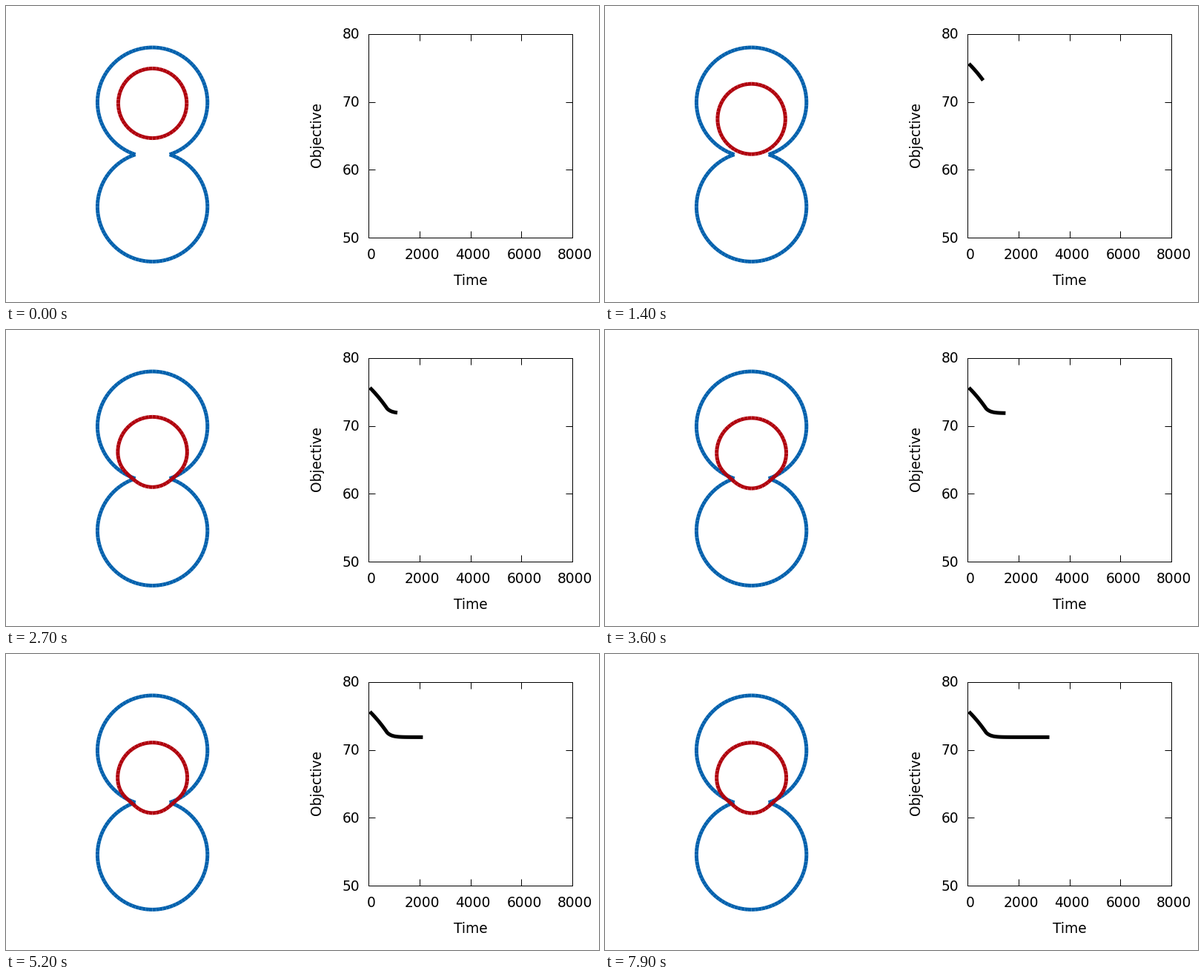
Recreate the animation shown at these times as a matplotlib script. Size 800 by 400 pixels, loop 8 s.

```python
import numpy as np
import matplotlib.pyplot as plt
from matplotlib.animation import FuncAnimation
from matplotlib.collections import LineCollection

W, H, DPI = 800, 400, 100
FRAMES, STEP = 80, 100
PX = 72 / DPI
BLUE, RED = "#0060ad", "#b0000c"
LEFT, TOP, SIDE = 489, 38, 275
RIGHT, BOTTOM = LEFT + SIDE, TOP + SIDE
CX = 197.6
R, UPPER, LOWER = 74.2, 130.2, 271.2
HIT = 19  # step at which the drop reaches the neck

plt.rcParams["font.family"] = "DejaVu Sans"
fig = plt.figure(figsize=(W / DPI, H / DPI), dpi=DPI, facecolor="white")
ax = fig.add_axes([0, 0, 1, 1])
ax.set_xlim(0, W)
ax.set_ylim(H, 0)
ax.axis("off")


def sink(n, start, speed, accel, hit, rest, tau):
    """Accelerate until hit, then settle exponentially at rest."""
    m = np.minimum(n, hit)
    y = start + speed * m + accel * m * m
    return rest - (rest - y) * np.exp(-np.maximum(n - hit, 0) / tau)


def pieces(x, y):
    pts = np.column_stack([x, y])
    return np.stack([pts[:-1], pts[1:]], axis=1)


def stroke(color, z):
    lines = LineCollection([], colors=color, linewidths=5 * PX,
                           capstyle="butt", zorder=z)
    ax.add_collection(lines, autolim=False)
    return lines


def rule(x, y):
    ax.plot(x, y, color="black", lw=PX, solid_capstyle="butt",
            solid_joinstyle="miter")


def label(x, y, s, **kw):
    kw = {"ha": "center", "va": "baseline", "fontsize": 18.67 * PX, **kw}
    ax.text(x, y, s, **kw)


def vessel():
    """Two overlapping circles, open at the neck."""
    neck = np.arccos((LOWER - UPPER) / 2 / R)
    a = np.linspace(neck, 2 * np.pi - neck, 91)
    x = CX + R * np.sin(a)
    dy = R * np.cos(a)
    return np.concatenate([pieces(x, UPPER + dy), pieces(x, LOWER - dy)])


def drop(n):
    """Ring that stretches while sinking and is pinched by the neck."""
    cy = sink(n, 131.5, 1.38, 0.0096, HIT, 167.5, 9)
    squeeze = np.clip((cy - 159) / 8, 0, 1)
    stretch = 0.6 * np.sin(np.pi * min(n / HIT, 1))
    rx = 46.2 + 0.8 * squeeze - stretch
    ry = 47.1 + 0.6 * squeeze + stretch
    a = np.linspace(0, 2 * np.pi, 61)
    tilt = np.arctan2(np.abs(np.cos(a)), np.sin(a))
    k = 1 - 0.07 * squeeze * np.exp(-((tilt - 0.72) / 0.38) ** 2)
    return pieces(CX + rx * k * np.cos(a), cy + ry * k * np.sin(a))


# Chart frame, ticks and labels
rule([LEFT, RIGHT, RIGHT, LEFT, LEFT], [TOP, TOP, BOTTOM, BOTTOM, TOP])
for v in range(0, 8001, 2000):
    x = LEFT + SIDE * v / 8000
    rule([x, x], [TOP, TOP + 9])
    rule([x, x], [BOTTOM, BOTTOM - 9])
    label(x + 3.7, 342, str(v))
for v in range(50, 81, 10):
    y = BOTTOM - SIDE * (v - 50) / 30
    rule([LEFT, LEFT + 9], [y, y])
    rule([RIGHT, RIGHT - 9], [y, y])
    label(477.5, y + 6.5, str(v), ha="right")
label(627, 377, "Time")
label(425, 174.5, "Objective", rotation=90, rotation_mode="anchor")

stroke(BLUE, 3).set_segments(vessel())
ring = stroke(RED, 4)
curve, = ax.plot([], [], color="black", lw=5 * PX, zorder=5,
                 solid_capstyle="butt", solid_joinstyle="round")

steps = np.arange(FRAMES)
curve_x = LEFT + 0.5 + SIDE * 40 * (steps + 1) / 8000
curve_y = sink(steps, 78, 1.345, 0.0185, 17, 112.4, 4.5)


def update(n):
    ring.set_segments(drop(n))
    end = n + 1 if n else 0
    curve.set_data(curve_x[:end], curve_y[:end])
    return ring, curve


anim = FuncAnimation(fig, update, frames=FRAMES, interval=STEP,
                     repeat=True, repeat_delay=0, blit=False)
plt.show()
```
